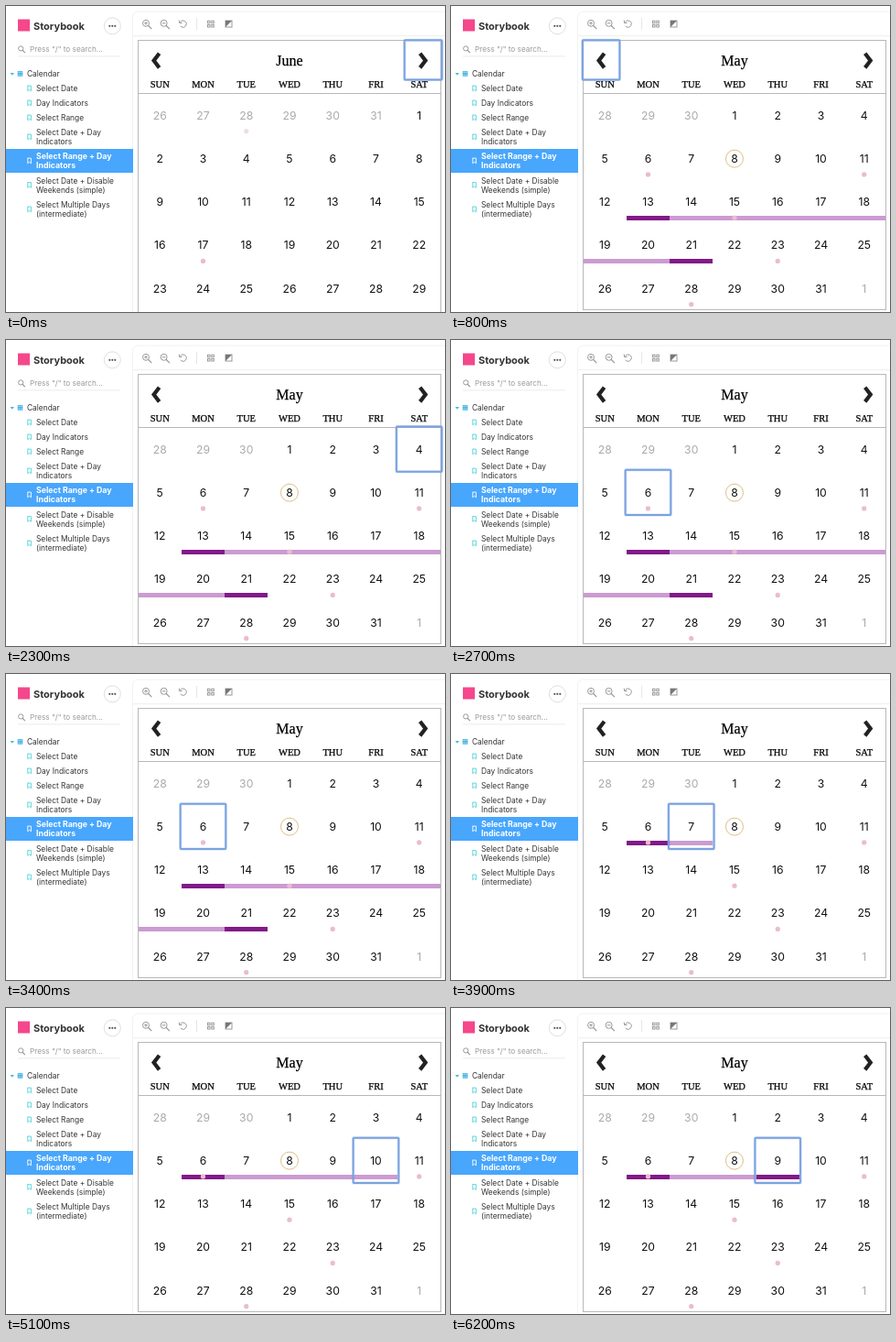
These frames come from a looping animation (480 by 334 pixels, 6.6 s). An HTML page with a canvas:

```html
<!DOCTYPE html>
<html lang="en">
<head>
<meta charset="utf-8">
<title>Calendar: Select Range + Day Indicators</title>
<style>
  html, body { margin: 0; width: 100%; height: 100%; overflow: hidden; background: #fff; }
  canvas { display: block; width: 480px; height: 334px; }
</style>
</head>
<body>
<canvas id="stage"></canvas>
<script>
const W = 480, H = 334, LOOP = 6600;
const SANS = 'Inter, "Open Sans", sans-serif';
const SERIF = '"Liberation Serif", "Noto Serif", serif';
const LEFT = 144.6, TOP = 95.7, CELL = 47.25;
const PLUM = '#cb9bd2', PURPLE = '#811a88', TEAL = '#52d3d8', GREY = '#999';

const canvas = document.getElementById('stage');
const ctx = canvas.getContext('2d');
const ratio = window.devicePixelRatio || 1;
canvas.width = W * ratio;
canvas.height = H * ratio;

// Keyboard focus over time: a button or a day of May.
const FOCUS = [
  [0, 'next'], [100, 'prev'], [1500, 'next'], [1700, 1], [1900, 2], [2100, 3],
  [2300, 4], [2500, 5], [2700, 6], [3800, 7], [4100, 8], [4200, 9], [4300, 10],
  [4500, 11], [5100, 10], [5300, 9]
];
const MAY_AT = 800, START_AT = 3500, END_AT = 5600;

const MONTHS = {
  May: { lead: 3, before: 30, days: 31, dots: [6, 11, 15, 23, 28], end: true },
  June: { lead: 6, before: 31, days: 30, dots: [-3, 17], end: false }
};

const ITEMS = [
  [93, 'Select Date'], [109, 'Day Indicators'], [125, 'Select Range'],
  [141, 'Select Date + Day', 'Indicators'],
  [167, 'Select Range + Day', 'Indicators'],
  [193.5, 'Select Date + Disable', 'Weekends (simple)'],
  [220, 'Select Multiple Days', '(intermediate)']
];

function text(str, x, y, font, color, align = 'left') {
  ctx.font = font;
  ctx.fillStyle = color;
  ctx.textAlign = align;
  ctx.fillText(str, x, y);
}

// Serif heading, slightly heavier than the regular weight.
function heading(str, x, y, size) {
  text(str, x, y, `${size}px ${SERIF}`, '#000', 'center');
  ctx.strokeStyle = '#000';
  ctx.lineWidth = 0.25;
  ctx.strokeText(str, x, y);
}

function box(x, y, w, h, color) {
  ctx.fillStyle = color;
  ctx.fillRect(x, y, w, h);
}

function disc(x, y, r, color) {
  ctx.fillStyle = color;
  ctx.beginPath();
  ctx.arc(x, y, r, 0, Math.PI * 2);
  ctx.fill();
}

function ring(x, y, r, color, width = 1) {
  ctx.strokeStyle = color;
  ctx.lineWidth = width;
  ctx.beginPath();
  ctx.arc(x, y, r, 0, Math.PI * 2);
  ctx.stroke();
}

function line(points, color, width = 1) {
  ctx.strokeStyle = color;
  ctx.lineWidth = width;
  ctx.beginPath();
  points.forEach(([x, y], i) => i ? ctx.lineTo(x, y) : ctx.moveTo(x, y));
  ctx.stroke();
}

function triangle(points, color) {
  ctx.fillStyle = color;
  ctx.beginPath();
  points.forEach(([x, y], i) => i ? ctx.lineTo(x, y) : ctx.moveTo(x, y));
  ctx.fill();
}

function lens(x, y, r, color) {
  ring(x, y, r, color);
  line([[x + r * 0.7, y + r * 0.7], [x + r * 1.8, y + r * 1.8]], color, 1.2);
}

function grid4(x, y, size, gap, color) {
  ctx.strokeStyle = color;
  ctx.lineWidth = 1;
  for (const dx of [0, gap]) for (const dy of [0, gap]) ctx.strokeRect(x + dx, y + dy, size, size);
}

function bookmark(x, y, color) {
  line([[x - 1.8, y - 2.9], [x + 1.8, y - 2.9], [x + 1.8, y + 2.8], [x, y + 1.2],
    [x - 1.8, y + 2.8], [x - 1.8, y - 3.3]], color, 0.9);
}

function sidebar() {
  box(13, 14.5, 13, 13, '#f5478b');
  text('Storybook', 30, 25.6, `bold 11px ${SANS}`, '#333');
  ring(116.3, 21.8, 9, '#dcdfe3');
  for (const dx of [-3, 0, 3]) disc(116.3 + dx, 21.8, 1.1, '#555');

  lens(16.2, 46.4, 2.6, GREY);
  text('Press "/" to search...', 26, 50.2, `8.2px ${SANS}`, GREY);
  box(13, 54.5, 112, 0.8, '#e6e8ea');

  triangle([[4.5, 73], [9, 73], [6.8, 75.8]], '#52b8c8');
  grid4(13.2, 71.6, 2, 2.6, '#45b3e8');
  text('Calendar', 23, 77.2, `8.4px ${SANS}`, '#333');

  box(0, 156, 139, 26, '#48a6fc');
  ITEMS.forEach(([y, ...rows], i) => {
    const on = i === 4;
    const font = on ? `bold 8.75px ${SANS}` : `8.4px ${SANS}`;
    bookmark(25.6, y - 3 + (rows.length - 1) * 5, on ? '#fff' : TEAL);
    rows.forEach((row, k) => text(row, 33, y + k * 10.4, font, on ? '#fff' : '#333'));
  });
}

function panel() {
  ctx.strokeStyle = '#f1f2f3';
  ctx.lineWidth = 1;
  ctx.beginPath();
  ctx.roundRect(138.5, 6, 360, 350, 6);
  ctx.stroke();
  box(139, 32.3, 341, 0.8, '#ececec');
}

function toolbar() {
  for (const x of [153, 172.6]) {
    lens(x, 18.8, 3.5, GREY);
    line([[x - 1.8, 18.8], [x + 1.8, 18.8]], GREY);
  }
  line([[153, 17], [153, 20.6]], GREY);

  ctx.beginPath();
  ctx.arc(193.6, 19.6, 3.7, Math.PI * 1.15, Math.PI * 2.8);
  ctx.stroke();
  line([[189.3, 15.6], [189.6, 18.6], [192.6, 18.3]], GREY);
  box(208, 13, 0.8, 13, '#e0e0e0');

  grid4(220.5, 16.2, 2.5, 4.3, GREY);
  ctx.strokeRect(240, 16, 7, 7);
  triangle([[240, 16], [247, 16], [240, 23]], '#777');
}

function chevron(x, dir) {
  line([[x + 3.3 * dir, 51.8], [x - 2.7 * dir, 59.6], [x + 3.3 * dir, 67.4]], '#222', 4.2);
}

function focusRing(x, y, w, h) {
  for (const [color, width] of [['rgba(105,150,225,0.3)', 3.2], ['#7ba2e0', 1.9]]) {
    ctx.strokeStyle = color;
    ctx.lineWidth = width;
    ctx.beginPath();
    ctx.roundRect(x, y, w, h, 1);
    ctx.stroke();
  }
}

// First and last day of the range, and whether its end is fixed.
function rangeAt(t, focus) {
  if (t < START_AT) return [13, 21, true];
  if (t < END_AT) return [6, focus, false];
  return [6, 9, true];
}

function calendar(t) {
  const name = t < MAY_AT ? 'June' : 'May';
  const month = MONTHS[name];
  const focus = FOCUS.filter(([at]) => at <= t).pop()[1];
  const cellOf = day => {
    const i = day + month.lead - 1;
    return [LEFT + i % 7 * CELL, TOP + Math.floor(i / 7) * CELL];
  };

  ctx.strokeStyle = '#b8b8b8';
  ctx.lineWidth = 1;
  ctx.strokeRect(144.5, 37.5, 331, month.end ? 294 : 320);
  box(145, 95, 330, 1, '#b8b8b8');
  chevron(164.3, 1);
  chevron(456, -1);
  heading(name, 310, 65, 16);
  'SUN MON TUE WED THU FRI SAT'.split(' ').forEach((d, i) =>
    heading(d, LEFT + (i + 0.5) * CELL, 89.2, 10.5));

  if (name === 'May') {
    const [from, to, fixed] = rangeAt(t, focus);
    for (let day = from; day <= to; day++) {
      const [x, y] = cellOf(day);
      const edge = day === from || fixed && day === to;
      const start = Math.round(x), stop = Math.round(x + CELL);
      box(start, Math.round(y + 38.6), stop - start, 5, edge ? PURPLE : PLUM);
    }
    const [x, y] = cellOf(8);
    ring(x + CELL / 2, y + 23.7, 9.5, '#dcc084');
  }

  for (const day of month.dots) {
    const [x, y] = cellOf(day);
    disc(x + CELL / 2, y + 41, 2.6, day < 1 ? '#ecdfe5' : '#ebbbd0');
  }

  for (let i = 0; i < 35; i++) {
    const day = i - month.lead + 1;
    const inside = day > 0 && day <= month.days;
    const label = inside ? day : day < 1 ? month.before + day : day - month.days;
    const [x, y] = cellOf(day);
    text(label, x + CELL / 2, y + 27.9, `12.2px ${SANS}`, inside ? '#111' : '#aaa', 'center');
  }

  if (focus === 'prev') focusRing(143.8, 37.3, 40.6, 43.2);
  else if (focus === 'next') focusRing(435.7, 37.3, 41, 43.2);
  else {
    const [x, y] = cellOf(focus);
    focusRing(x - 1.2, y - 1.2, CELL + 2.4, CELL + 2);
  }
}

function draw(now) {
  ctx.setTransform(ratio, 0, 0, ratio, 0, 0);
  box(0, 0, W, H, '#fff');
  panel();
  sidebar();
  toolbar();
  calendar(now % LOOP);
}

const begin = performance.now();
function tick() {
  draw(performance.now() - begin);
  requestAnimationFrame(tick);
}
tick();
</script>
</body>
</html>
```
